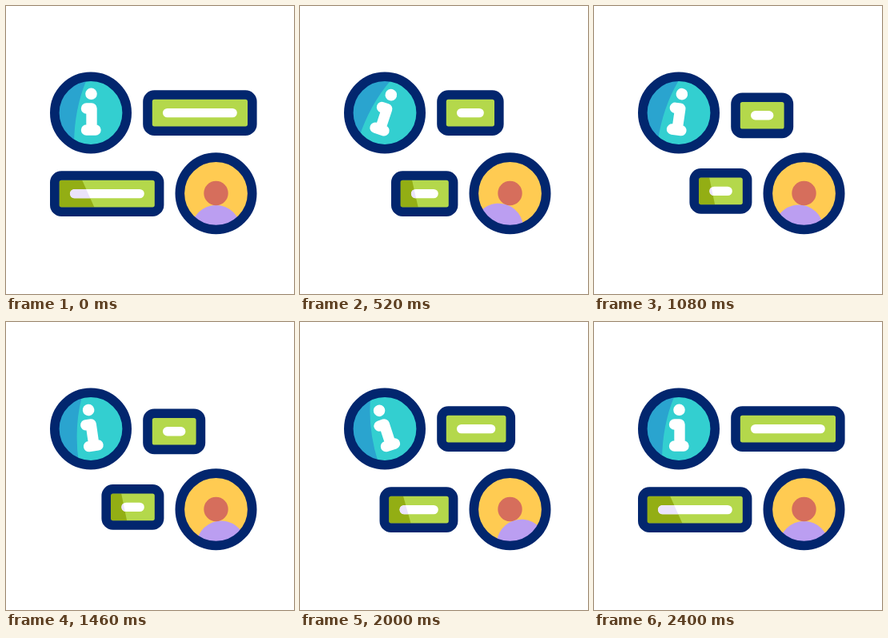
An HTML page that plays this animation: 360x360 px, repeating every 2.42 s.

```html
<!DOCTYPE html>
<html lang="en">
<head>
<meta charset="utf-8">
<title>Chat profile</title>
<style>
  html, body { margin: 0; width: 100%; height: 100%; overflow: hidden; background: #fff; }
  svg { display: block; width: 100vw; height: 100vh; }
  .frame { fill: none; stroke: #02266e; stroke-width: 11.6; }
</style>
</head>
<body>
<svg viewBox="0 0 360 360">
  <defs>
    <clipPath id="infoClip"><circle cx="106" cy="133.5" r="42"/></clipPath>
    <clipPath id="userClip"><circle cx="262.5" cy="234.3" r="42"/></clipPath>
    <clipPath id="shadeClip"><path id="shadeEdge"/></clipPath>
  </defs>

  <g clip-path="url(#infoClip)">
    <g id="info">
      <circle cx="106" cy="133.5" r="46" fill="#33cfd0"/>
      <path d="M101 90L100 94Q85.500 129 85 172V182H50V90Z" fill="#2aa4cf"/>
      <circle cx="106.500" cy="109.800" r="7.300" fill="#fff"/>
      <path d="M100.500 128H107V155M100.500 155H112" fill="none" stroke="#fff"
            stroke-width="13.400" stroke-linecap="round" stroke-linejoin="round"/>
    </g>
  </g>
  <circle class="frame" cx="106" cy="133.5" r="45.2"/>

  <g clip-path="url(#userClip)">
    <circle cx="262.5" cy="234.3" r="42" fill="#ffcb52"/>
    <circle id="body" cx="262.5" cy="280" r="31" fill="#bb9ef1"/>
    <circle cx="262.5" cy="234" r="15.2" fill="#d66e5c"/>
  </g>
  <circle class="frame" cx="262.5" cy="234.3" r="45.2"/>

  <g id="right">
    <rect id="rightFill" x="177" y="111" height="45.200" fill="#b4d84b"/>
    <rect id="rightLine" x="196" y="127.900" height="11.400" rx="5.700" fill="#fff"/>
    <rect id="rightFrame" class="frame" x="177" y="111" height="45.200" rx="8.500"/>
  </g>

  <g id="left">
    <rect id="leftFill" y="212" height="45.200" fill="#b4d84b"/>
    <path id="shade" fill="#93ae14"/>
    <rect id="leftLine" y="228.900" height="11.400" rx="5.700" fill="#fff"/>
    <rect id="leftTint" y="228.900" height="11.400" rx="5.700" fill="#ebe3fb" clip-path="url(#shadeClip)"/>
    <rect id="leftFrame" class="frame" y="212" height="45.200" rx="8.500"/>
  </g>
</svg>
<script>
const LOOP = 2420;
const FULL = 142.4, SHRINK = 64.4, BORDER = 11.6;
const el = id => document.getElementById(id);
const set = (id, attrs) => {
  for (const k in attrs) el(id).setAttribute(k, attrs[k]);
};

// eased 0..1 between two times
function ease(t, from, to) {
  const p = Math.min(1, Math.max(0, (t - from) / (to - from)));
  return (1 - Math.cos(Math.PI * p)) / 2;
}

function draw(t) {
  const swing = 19 * (ease(t, 0, 600) - 2 * ease(t, 600, 1940) + ease(t, 1940, 2400));
  const width = FULL - SHRINK * (ease(t, 0, 640) - ease(t, 1760, 2400));
  const lift = 3.2 * (ease(t, 580, 820) - ease(t, 1580, 1820));

  set('info', { transform: `rotate(${swing} 106 133.5)` });
  set('body', { transform: `rotate(${swing} 262.5 234.3)` });
  set('right', { transform: `translate(0 ${lift})` });
  set('left', { transform: `translate(0 ${-lift})` });

  const box = { width: width - BORDER };
  const line = { width: width - 49.6 };
  set('rightFill', box);
  set('rightFrame', box);
  set('rightLine', line);

  const x = 197.4 - width;
  box.x = x + BORDER / 2;
  line.x = x + 25;
  set('leftFill', box);
  set('leftFrame', box);
  set('leftLine', line);
  set('leftTint', line);

  const inner = x + BORDER, span = width - 2 * BORDER;
  const edge = `M${x + 4} 217.8H${inner + 0.24 * span}L${inner + 0.367 * span} 251.4H${x + 4}Z`;
  set('shade', { d: edge });
  set('shadeEdge', { d: edge });
}

let start = null;
function tick(now) {
  if (start === null) start = now;
  draw((now - start) % LOOP);
  requestAnimationFrame(tick);
}
draw(0);
requestAnimationFrame(tick);
</script>
</body>
</html>
```
